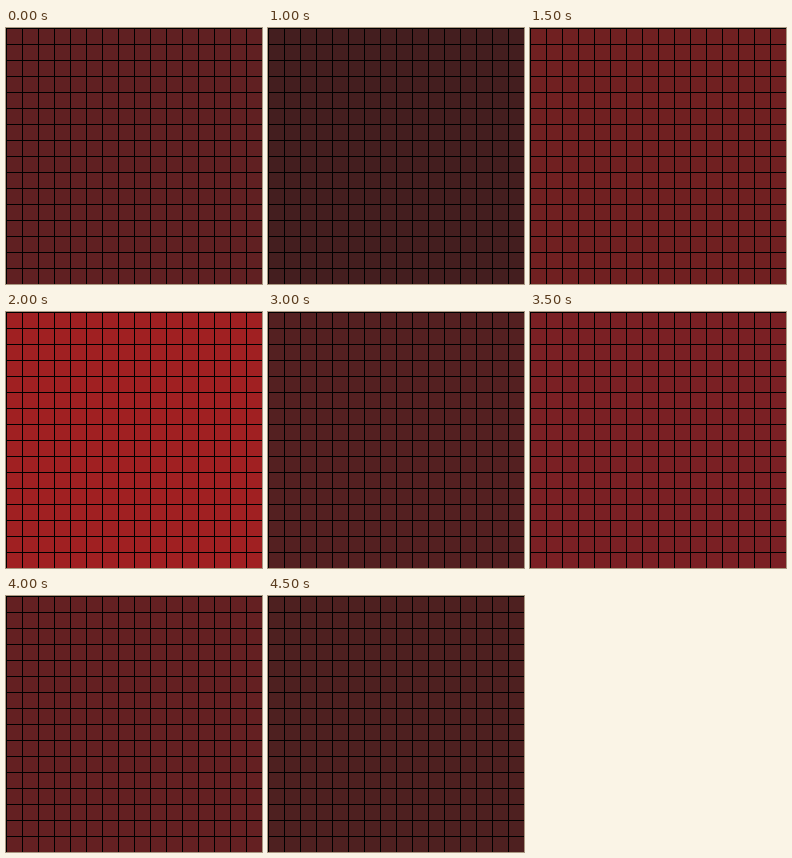
Animation, 256 px wide and 256 px high, one loop 5000 ms. Source, as an HTML page:

```html
<!DOCTYPE html>
<html lang="en">
<head>
<meta charset="utf-8">
<title>Pulsing grid</title>
<style>
  html, body {
    margin: 0;
    width: 100%;
    height: 100%;
    overflow: hidden;
    background: #000;
  }
  .grid {
    position: absolute;
    left: 0;
    top: 0;
    width: 256px;
    height: 256px;
    background-color: #602022;
    background-image:
      linear-gradient(to right, #000 1px, transparent 1px),
      linear-gradient(to bottom, #000 1px, transparent 1px);
    background-size: 16px 16px;
    animation: pulse 5s step-end infinite;
  }
  @keyframes pulse {
    0%   { background-color: #602022; }
    20%  { background-color: #441e1f; }
    30%  { background-color: #702021; }
    40%  { background-color: #a02022; }
    50%  { background-color: #782021; }
    60%  { background-color: #542021; }
    70%  { background-color: #7a2024; }
    80%  { background-color: #642022; }
    90%  { background-color: #4e2020; }
    100% { background-color: #602022; }
  }
</style>
</head>
<body>
<div class="grid"></div>
</body>
</html>
```
